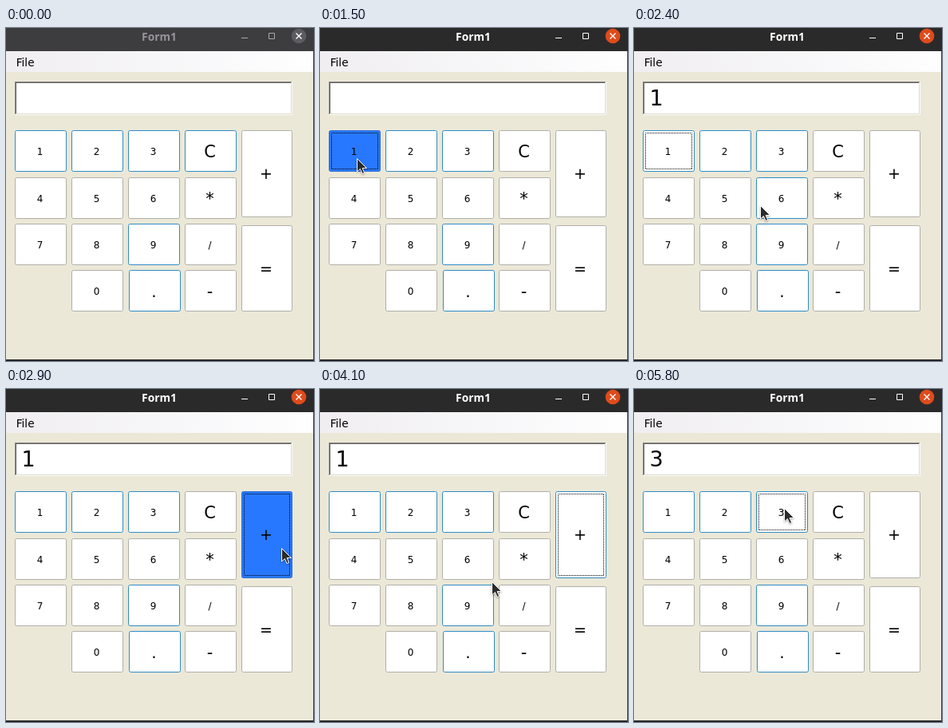
Animation, 386 px wide and 417 px high, one loop 8000 ms. Source, as an HTML page:

```html
<!DOCTYPE html>
<html lang="en">
<head>
<meta charset="utf-8">
<title>Calculator</title>
<style>
  html, body { margin: 0; width: 100%; height: 100%; overflow: hidden; background: #ebe8d8; }
  svg { display: block; width: 386px; height: 417px; }
  text { font-family: "DejaVu Sans", sans-serif; fill: #000; }
  .title { font: bold 13.8px "Noto Sans", "Open Sans", sans-serif; }
  .cursor { filter: drop-shadow(0.5px 1px 0.8px rgba(0, 0, 0, 0.35)); }
</style>
</head>
<body>
<svg id="stage" viewBox="0 0 386 417"></svg>
<script>
const LOOP = 8000, STEP = 100;
const BLUE = "#308cc6", GREY = "#b0afa9";
const stage = document.getElementById("stage");

function set(node, attrs) {
  for (const key in attrs) node.setAttribute(key, attrs[key]);
}
function add(tag, attrs, text = "") {
  const node = document.createElementNS("http://www.w3.org/2000/svg", tag);
  set(node, attrs);
  node.textContent = text;
  return stage.appendChild(node);
}
function box(x, y, width, height, attrs) {
  return add("rect", { x, y, width, height, ...attrs });
}

// Window frame and menu
const bar = box(0, 0, 386, 29);
const title = add("text", { x: 192, y: 16, class: "title", "text-anchor": "middle" }, "Form1");
const sizers = add("path", { d: "M295 12.5h8M329.5 6.5h7v7h-7z", fill: "none" });
const close = add("circle", { cx: 367, cy: 10, r: 9.3 });
add("path", { d: "M363.5 6.5l7 7m0-7l-7 7", stroke: "#fff", "stroke-width": 1.4 });
const shade = add("linearGradient", { id: "menu" });
for (const [offset, color] of [[0, "#f0eef0"], [1, "#fefeff"]]) {
  shade.appendChild(add("stop", { offset, "stop-color": color }));
}
box(0, 29, 385, 26, { fill: "url(#menu)" });
add("text", { x: 12.7, y: 48, "font-size": 13.7 }, "File");
box(0, 415, 386, 2, { fill: "#252426" });
box(385, 29, 1, 388, { fill: "#3a393b" });

// Sunken display
["#fbfaf6", "#8d8c86", "#dddbd0", "#5f5f5c", "#fff"].forEach((fill, i) => {
  const near = Math.floor(i / 2), far = Math.ceil(i / 2);
  box(11 + near, 67 + near, 348 - near - far, 42 - near - far, { fill });
});
const display = add("text", { x: 19.5, y: 97, "font-size": 27 });

// Keypad
const buttons = [];
function addButton(label, x, y, w, h, size) {
  const face = box(x + 0.5, y + 0.5, w - 1, h - 1, { rx: 2 });
  const focus = box(x + 3.5, y + 3.5, w - 7, h - 7,
    { fill: "none", stroke: "#000", "stroke-dasharray": 1, "stroke-dashoffset": 0.5 });
  const baseline = Math.round(y + Math.floor(h / 2) + size * 0.38);
  add("text", { x: x + w / 2 - 1, y: baseline, "font-size": size, "text-anchor": "middle" }, label);
  buttons.push({ label, x, y, w, h, face, focus });
}
["123C", "456*", "789/", " 0 -"].forEach((keys, row) => {
  [...keys].forEach((key, col) => {
    const size = "C*-".includes(key) ? 21 : 12;
    if (key !== " ") addButton(key, 11 + 71 * col, Math.round(128.2 + 58.35 * row), 65, 52, size);
  });
});
addButton(".", 154, 303, 65, 52, 20);
addButton("+", 295, 128, 64, 109, 19);
addButton("=", 295, 247, 64, 108, 19);

const cursor = add("path", {
  d: "M0 0V16.5L3.9 13L6.5 19L9.2 17.9L6.6 12H12Z", class: "cursor",
  fill: "#2b2b2b", stroke: "#fff", "stroke-linejoin": "round"
});

// Each move leads from the last resting point to x, y; sag bends it down
const entry = { x: 24, y: -10 };
const moves = [
  { start: 800, steps: 5, x: 48, y: 163 },
  { start: 1500, steps: 1, x: 47, y: 163 },
  { start: 2200, steps: 8, x: 346, y: 199, sag: 48 },
  { start: 3600, steps: 4, x: 262, y: 265 },
  { start: 4100, steps: 1, x: 216, y: 241 },
  { start: 4200, steps: 1, x: 214, y: 239 },
  { start: 4400, steps: 6, x: 192, y: 143 },
  { start: 5200, steps: 2, x: 189, y: 149 }
];
const clicks = [
  { key: "1", press: 1500, release: 1700 },
  { key: "+", press: 2900, release: 3500 },
  { key: "3", press: 5700, release: 5800 }
];

function pointerAt(t) {
  const index = moves.findLastIndex(move => move.start <= t);
  if (index < 0) return null;
  const from = moves[index - 1] || entry;
  const { start, steps, x, y, sag = 0 } = moves[index];
  const u = Math.min(1, (Math.floor((t - start) / STEP) + 1) / steps);
  return {
    x: Math.round(from.x + (x - from.x) * u),
    y: Math.round(from.y + (y - from.y) * u + sag * 4 * u * (1 - u))
  };
}
function contains(b, p) {
  return p.x >= b.x && p.x < b.x + b.w && p.y >= b.y && p.y < b.y + b.h;
}

function draw(t) {
  const tip = pointerAt(t);
  const click = clicks.findLast(c => c.press <= t);
  const typed = clicks.findLast(c => c.release <= t && c.key !== "+");
  const active = Boolean(click);

  set(bar, { fill: active ? "#2b2a2b" : "#3d3c3f" });
  title.style.fill = active ? "#fff" : "#969498";
  set(sizers, { stroke: active ? "#fff" : "#a9a8ab" });
  set(close, { fill: active ? "#df4b1b" : "#5c5b5f" });
  display.textContent = typed ? typed.key : "";

  // Some keys keep their highlight; C loses it at the first click
  const highlighted = active ? "1239." : "1239.C";
  for (const b of buttons) {
    const focused = active && click.key === b.label;
    const down = focused && t < click.release;
    const lit = focused || highlighted.includes(b.label) || (tip && contains(b, tip));
    set(b.face, { fill: down ? "#2878ff" : "#fff", stroke: down ? "#2c6fd6" : lit ? BLUE : GREY });
    set(b.focus, { visibility: focused ? "visible" : "hidden" });
  }

  set(cursor, { visibility: tip ? "visible" : "hidden" });
  if (tip) set(cursor, { transform: `translate(${tip.x - 0.5} ${tip.y + 0.5})` });
}

function frame() {
  draw(performance.now() % LOOP);
  requestAnimationFrame(frame);
}
frame();
</script>
</body>
</html>
```
